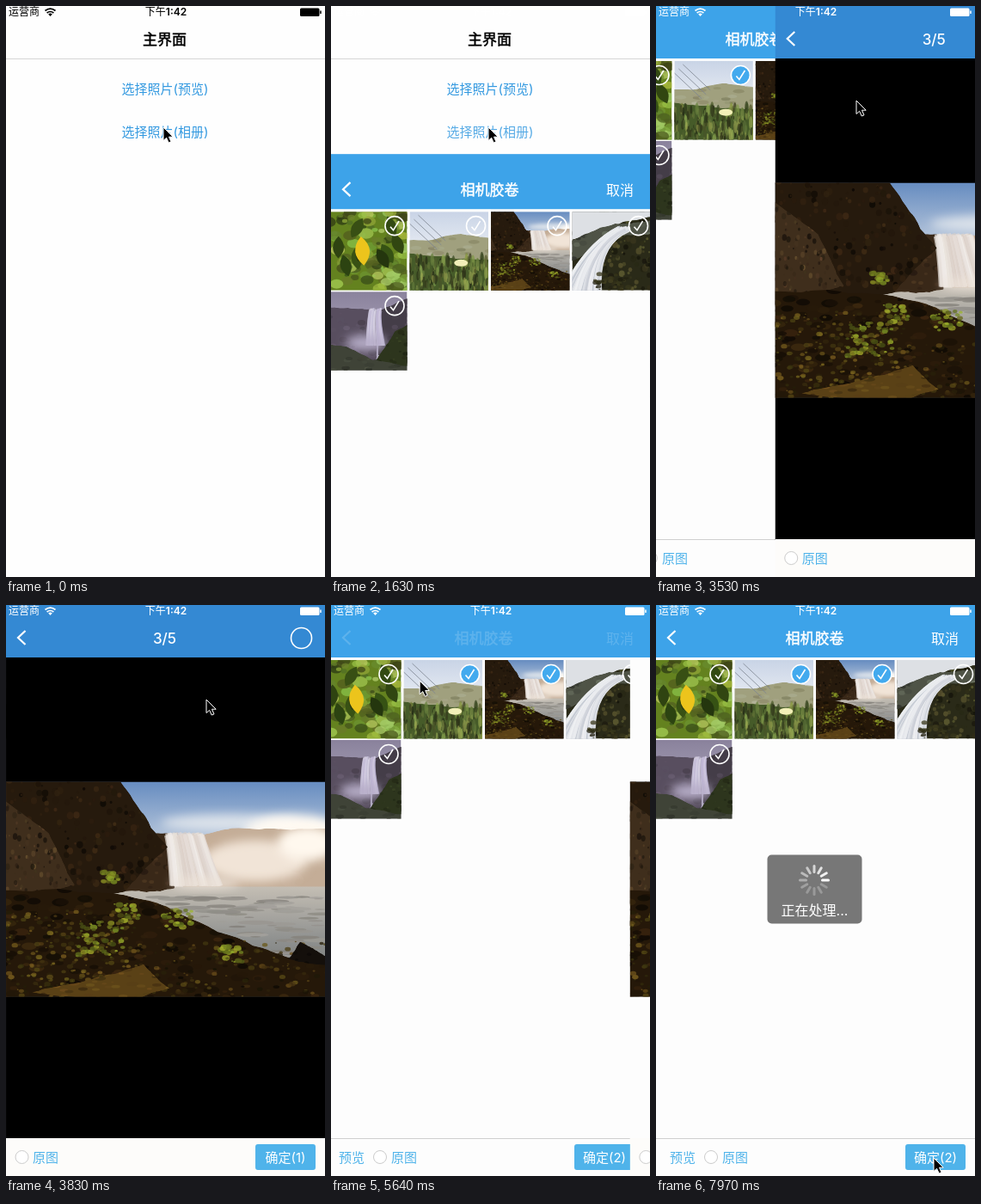
These frames come from a looping animation (371 px wide and 664 px high, 8000 ms). An HTML page:

```html
<!DOCTYPE html>
<html lang="zh-CN">
<head>
<meta charset="utf-8">
<style>
html, body { margin: 0; width: 100%; height: 100%; overflow: hidden; background: #fefefe; }
svg { display: block; }
text { font-family: Inter, "Noto Sans CJK SC", "Noto Sans CJK", sans-serif; white-space: pre; }
.mid { text-anchor: middle; }
.title { stroke: currentColor; stroke-width: .45px; }
</style>
</head>
<body>
<svg id="stage" width="371" height="664" viewBox="0 0 371 664"></svg>
<script>
const BLUE = '#3da3e9', LINK = '#4fb3ea', GRAY = '#aaa';
const $ = id => document.getElementById(id);
const times = (n, make) => Array.from({ length: n }, (_, i) => make(i)).join('');
const rect = (x, y, w, h, fill, more = '') =>
  `<rect x="${x}" y="${y}" width="${w}" height="${h}" fill="${fill}" ${more}/>`;
const text = (x, y, size, str, fill, more = '') =>
  `<text x="${x}" y="${y}" font-size="${size}" fill="${fill}" ${more}>${str}</text>`;

// ---- Scenery: seeded texture on a few key points ----
let seed = 7, clips = 0;
const rnd = () => (seed = seed * 16807 % 2147483647) / 2147483647;
const vary = v => (rnd() - .5) * v;
// Tone: hue, saturation, lightness, spread of lightness
const tone = ([h, s, l, v = 0]) => `hsl(${h + vary(v / 2)} ${s}% ${l + vary(v)}%)`;

const scatter = (n, x, y, w, h, size, color, slim = 1) => times(n, () => {
  const r = size * (.3 + rnd());
  return `<ellipse cx="${x + rnd() * w}" cy="${y + rnd() * h}" rx="${r * slim}" ry="${r * .7 / slim}"
    fill="${tone(color)}" opacity=".75"/>`;
});

// Polygon with edges broken up by midpoint displacement, strewn with dabs
function land(pts, color, n, size, slim) {
  let p = pts.split(' ').map(s => s.split(',').map(Number));
  for (let pass = 0; pass < 4; pass++) p = p.flatMap((a, i) => {
    const b = p[(i + 1) % p.length], d = .16 * Math.hypot(b[0] - a[0], b[1] - a[1]);
    return [a, [(a[0] + b[0] + vary(d)) / 2, (a[1] + b[1] + vary(d)) / 2]];
  });
  const xs = p.map(q => q[0]), ys = p.map(q => q[1]), id = 'clip' + clips++;
  const x = Math.min(...xs), y = Math.min(...ys);
  return `<clipPath id="${id}"><polygon points="${p.join(' ')}"/></clipPath><g clip-path="url(#${id})">
    <polygon points="${p.join(' ')}" fill="${tone(color.slice(0, 3))}"/>
    ${scatter(n, x, y, Math.max(...xs) - x, Math.max(...ys) - y, size, color, slim)}</g>`;
}

// Falling water: streaks from a lip of width w, drifting by dx over h and widening to w2
const stream = (x, y, w, dx, h, w2, n, color) => times(n, () => {
  const u = rnd(), x0 = x + u * w, x1 = x + dx + u * w2;
  return `<path d="M${x0} ${y + vary(4)}Q${x0 + dx * .6} ${y + h * .25} ${x1} ${y + h}" fill="none"
    stroke="${tone(color)}" stroke-width="${w2 / 14}" opacity=".7"/>`;
});
const mist = (x, y, rx, ry, fill) =>
  `<ellipse cx="${x}" cy="${y}" rx="${rx}" ry="${ry}" fill="${fill}" filter="url(#soft)"/>`;
const leaf = (x, y, len, turn, fill) =>
  `<path d="M0 0Q${len * .5} ${len * .5} 0 ${len}Q${-len * .5} ${len * .5} 0 0" fill="${fill}"
    transform="translate(${x} ${y}) rotate(${turn})"/>`;
const grad = (id, ...stops) => `<linearGradient id="${id}" x2="0" y2="1">${stops.map((c, i) =>
  `<stop offset="${i / (stops.length - 1)}" stop-color="${c}"/>`).join('')}</linearGradient>`;
const photo = (id, w, h, body) =>
  `<symbol id="${id}" viewBox="0 0 ${w} ${h}" preserveAspectRatio="xMidYMid slice">${body}</symbol>`;

const photos =
  grad('day', '#c9d4e6', '#f2f4f7') + grad('blue', '#668cc0', '#b4c4da', '#f3e9df') +
  grad('lake', '#c4beb4', '#8d8f8e', '#6a6e70') + grad('dusk', '#8a829c', '#b9b3c8') +
  '<filter id="soft" x="-50%" y="-50%" width="200%" height="200%"><feGaussianBlur stdDeviation="6"/></filter>' +

  photo('p1', 92, 92, rect(0, 0, 92, 92, '#64821f') +
    scatter(130, 0, 0, 92, 92, 7, [78, 50, 38, 48]) +
    times(9, () => leaf(rnd() * 92, rnd() * 60, 26, vary(90), tone([85, 60, 16, 8]))) +
    leaf(38, 29, 34, -6, '#ecc41c')) +

  photo('p2', 92, 92, rect(0, 0, 92, 60, 'url(#day)') +
    land('-20,36 60,26 110,32 110,70 -20,70', [60, 15, 56, 25], 60, 4, 1.4) +
    land('-30,46 110,58 110,120 -30,120', [85, 38, 26], 0, 1) +
    scatter(240, 0, 54, 92, 40, 4, [75, 35, 30, 40], .45) +
    times(3, i => `<path d="M${i * 5} ${14 - i * 5}l32 30" stroke="#7d8590" stroke-width=".8"/>`) +
    '<ellipse cx="60" cy="60" rx="8" ry="4" fill="#f2efb8"/>') +

  photo('p3', 371, 250, rect(0, 0, 371, 130, 'url(#blue)') +
    mist(260, 48, 80, 10, '#dbe2ea') + mist(335, 62, 60, 24, '#fffaf3') +
    land('205,66 262,54 400,58 400,140 205,140', [30, 28, 68, 4], 20, 12) +
    mist(290, 92, 60, 24, '#f1e4d7') + mist(350, 72, 34, 20, '#fff8ee') +
    rect(0, 122, 371, 128, 'url(#lake)') +
    scatter(110, 140, 134, 231, 70, 7, [40, 4, 56, 16], 2.4) +
    land('150,62 190,60 196,124 130,128', [28, 40, 16, 14], 40, 4) +
    stream(186, 61, 44, 6, 60, 60, 70, [25, 22, 88, 18]) + mist(232, 118, 40, 6, '#ece2d8') +
    land('-60,-40 120,-20 188,76 138,128 -60,150', [30, 50, 10, 16], 420, 4, .8) +
    land('-20,10 50,60 80,120 -20,140', [30, 38, 18, 26], 200, 3, .7) +
    land('-60,124 165,138 330,205 420,215 420,300 -60,300', [32, 60, 9, 14], 420, 6, 1.2) +
    scatter(260, 0, 150, 150, 100, 3, [45, 60, 20, 24]) +
    scatter(160, 150, 185, 221, 65, 3, [42, 60, 16, 22]) +
    land('90,232 160,212 190,240 120,260 30,245', [38, 60, 22, 16], 60, 4, 1.4) +
    land('328,206 342,186 375,205 375,214', [30, 30, 6, 6], 10, 3) +
    [[112, 182, 60], [140, 152, 30], [200, 160, 34], [262, 200, 26], [122, 110, 20]].map(([x, y, s]) =>
      scatter(s, x - s / 2, y - s / 3, s, s * .7, 3.5, [66, 60, 32, 26])).join('')) +

  photo('p4', 92, 92, rect(0, 0, 92, 92, '#2a2a18') +
    scatter(200, 0, 0, 92, 92, 3.5, [55, 32, 17, 26], .8) +
    land('-30,-30 120,-30 120,4 60,12 -30,42', [215, 12, 88, 4], 0, 1) +
    land('-10,36 50,14 120,6 120,26 60,28 -10,62', [80, 8, 30, 28], 70, 4) +
    stream(54, 20, 14, -66, 74, 46, 110, [220, 14, 86, 24]) +
    scatter(40, 26, 72, 40, 20, 3, [55, 35, 14, 12])) +

  photo('p5', 92, 92, rect(0, 0, 92, 92, 'url(#dusk)') +
    land('-30,22 56,20 56,80 -30,84', [275, 10, 34, 16], 80, 4) +
    land('60,22 120,0 120,90 58,74', [280, 8, 26, 14], 60, 4) +
    stream(48, 21, 14, -4, 42, 22, 45, [258, 26, 82, 14]) + mist(44, 60, 24, 9, '#b7aec9') +
    land('-30,56 20,64 52,80 120,76 120,130 -30,130', [80, 10, 24, 14], 90, 4, 1.2) +
    land('120,26 78,46 56,80 120,90', [80, 30, 16, 12], 60, 3));

// ---- Interface parts ----
const tick = (id, x, y, r = 11) => `<g transform="translate(${x} ${y})"><g id="${id}">
  <circle r="${r}" fill="none" stroke="#fff" stroke-width="1.6"/>
  <path d="M-5 1L-1.5 5L5 -5.5" fill="none" stroke="#fff" stroke-width="1.6"/></g></g>`;
const thumbs = times(5, i => {
  const x = i % 4 * 94.5 - 3, y = 64 + 93 * (i >> 2);
  return `<use href="#p${i + 1}" x="${x}" y="${y}" width="91.5" height="91.5"/>` + tick('tick' + (i + 1), x + 77, y + 16.5);
});
const full = x => `<circle cx="${x}" cy="642" r="7.5" fill="#fff" stroke="#ccc"/>`;
const back = '<path d="M22.5 30L14 38L22.5 46" fill="none" stroke="#fff" stroke-width="2.2"/>';
const button = id => rect(290, 627, 70, 30, LINK, `id="${id}Box" rx="3"`) +
  text(325, 647.5, 15, '确定', '#fff', `id="${id}" class="mid"`);
const spokes = times(12, i =>
  `<path d="M0 -9.5V-16.5" transform="rotate(${-30 * i})" opacity="${Math.max(.25, 1 - i * .1)}"/>`);

$('stage').innerHTML = `<defs>${photos}</defs>
<g id="main">${rect(0, 0, 371, 664, '#fefefe')}${rect(0, 61, 371, 1, '#d6d6d6')}
  ${text(184.5, 45, 17, '主界面', '#000', 'class="mid title" color="#000"')}
  ${text(185, 101.5, 15, '选择照片(预览)', '#3399e0', 'class="mid"')}
  ${text(185, 151.5, 15, '选择照片(相册)', '#3399e0', 'class="mid" id="album"')}</g>
<g id="list">${rect(0, 0, 371, 664, '#fdfdfd')}${thumbs}
  ${rect(0, 620, 371, 1, '#cfcfcf')}${text(16, 647.5, 15, '预览', GRAY, 'id="look"')}
  ${full(64)}${text(77, 647.5, 15, '原图', GRAY, 'id="orig"')}${button('ok')}</g>
<g id="nav">${rect(0, -3, 371, 64, BLUE)}
  <g id="items">${back}${text(184.5, 45, 17, '相机胶卷', '#fff', 'class="mid title" color="#fff" id="title"')}
  ${text(336, 44.5, 16, '取消', '#fff', 'class="mid"')}</g></g>
<g id="view">${rect(0, 61, 371, 560, '#000', 'id="backdrop"')}
  <use href="#p3" y="205.5" width="371" height="250"/>
  ${rect(0, 620, 371, 44, '#fdfcfa')}${full(18.5)}${text(31, 647.5, 15, '原图', LINK)}${button('ok2')}
  <g id="viewNav">${rect(0, -3, 371, 64, '#3489d3')}${back}
  ${text(184.5, 45, 17, '3/5', '#fff', 'class="mid" font-weight="500"')}${tick('tick0', 343.5, 38.5, 12)}</g></g>
<g id="status">
  <text x="3" y="11.3" font-size="12">运营商</text>
  <g fill="none" stroke="currentColor" stroke-width="1.7"><path d="M45.5 5.5Q51.5 .8 57.5 5.5M47.6 8Q51.5 5 55.4 8"/></g>
  <path d="M49.2 9.4Q51.5 7.8 53.8 9.4L51.5 12Z"/>
  <text x="186" y="11.3" font-size="12" font-weight="600" class="mid"><tspan font-weight="500">下午</tspan>1:42</text>
  <rect x="342" y="2.5" width="22.5" height="9.5" rx="1.5"/><rect x="365.2" y="5.5" width="1.5" height="3.5"/></g>
<g id="hud">${rect(129.5, 290.5, 110, 80, '#777', 'rx="5"')}
  <g transform="translate(184 320)"><g id="spin" stroke="#fff" stroke-width="3" stroke-linecap="round">${spokes}</g></g>
  ${text(184.5, 361, 16, '正在处理...', '#fff', 'class="mid"')}</g>
<path id="cursor" d="M0 0V15.5L3.6 12.3L6.2 18L9 16.8L6.5 11.2H11.2Z" fill="#000" stroke="#fff"/>`;

// ---- Motion ----
const clamp = v => Math.min(1, Math.max(0, v));

// cubic-bezier(.36, .66, .04, 1)
function glide(ms, span = 500) {
  const p = clamp(ms / span), curve = (s, a, b) => 3 * (1 - s) * s * ((1 - s) * a + s * b) + s ** 3;
  let lo = 0, hi = 1;
  for (let i = 0; i < 24; i++) {
    const m = (lo + hi) / 2;
    curve(m, .36, .04) < p ? lo = m : hi = m;
  }
  return curve(hi, .66, 1);
}

// Pointer strokes: start, end, x, y
const strokes = [
  [2220, 2640, 164, 85], [2920, 3230, 233, 110], [3860, 4240, 342, 37], [4500, 5070, 27, 52],
  [5120, 5280, 18, 40], [5420, 5640, 102, 86], [5640, 5900, 295, 464], [6470, 7200, 323, 643]];
function pointer(t) {
  let x = 183, y = 141;
  for (const [a, b, tx, ty] of strokes) {
    const k = Math.sin(clamp((t - a) / (b - a)) * Math.PI / 2);
    x += (tx - x) * k;
    y += (ty - y) * k;
  }
  return [x, y];
}

const move = (id, x, y) => $(id).setAttribute('transform', `translate(${x} ${y})`);
const show = (id, on) => $(id).style.display = on ? '' : 'none';
const paint = (id, color) => $(id).setAttribute('fill', color);

const UP = 1496, PICK2 = 2880, PUSH = 3440, PICK3 = 4300, POP = 5395, BUSY = 7430;

// Picked ticks turn blue and swing in size once
function mark(id, t, at) {
  const k = clamp((t - at) / 330);
  $(id).setAttribute('transform', `scale(${1 + .12 * Math.sin(k * 2 * Math.PI) * (1 - k / 2)})`);
  $(id).firstElementChild.setAttribute('fill', t >= at ? '#43aaee' : 'none');
}

function draw(t) {
  const up = 667 * (1 - glide(t - UP)), popping = t >= POP;
  const depth = popping ? 1 - glide(t - POP) : glide(t - PUSH, 400);

  $('album').style.opacity = t < 1310 ? 1 : .25 + .75 * clamp((t - 1400) / 300);
  show('list', t >= UP);
  show('nav', t >= UP);
  move('list', -112 * depth, up);
  move('nav', popping ? 0 : -112 * depth, up);
  $('items').style.opacity = popping ? clamp((t - 5600) / 250) : 1;
  move('title', popping ? -112 * depth : 0, 0);

  show('view', depth > 0);
  move('view', 371 * (1 - depth), 0);
  paint('backdrop', popping ? '#fdfdfd' : '#000');
  show('viewNav', !popping);

  mark('tick2', t, PICK2);
  mark('tick3', t, PICK3);
  mark('tick0', t, PICK3);
  $('tick0').lastElementChild.style.display = t >= PICK3 ? '' : 'none';
  const count = (t >= PICK2) + (t >= PICK3);
  $('ok').textContent = $('ok2').textContent = count ? `确定(${count})` : '确定';
  paint('look', count ? LINK : GRAY);
  paint('orig', count ? LINK : GRAY);
  paint('ok', count ? '#fff' : GRAY);
  paint('okBox', count ? LINK : '#e6e6e6');

  const ink = t < UP ? '#000' : '#fff';
  paint('status', ink);
  $('status').style.color = ink;
  show('hud', t >= BUSY);
  $('spin').setAttribute('transform', `rotate(${30 * (Math.floor(t * .012) + 4)})`);
  move('cursor', ...pointer(t));
}

const begin = performance.now();
function loop() {
  draw((performance.now() - begin) % 8000);
  requestAnimationFrame(loop);
}
loop();
</script>
</body>
</html>
```
